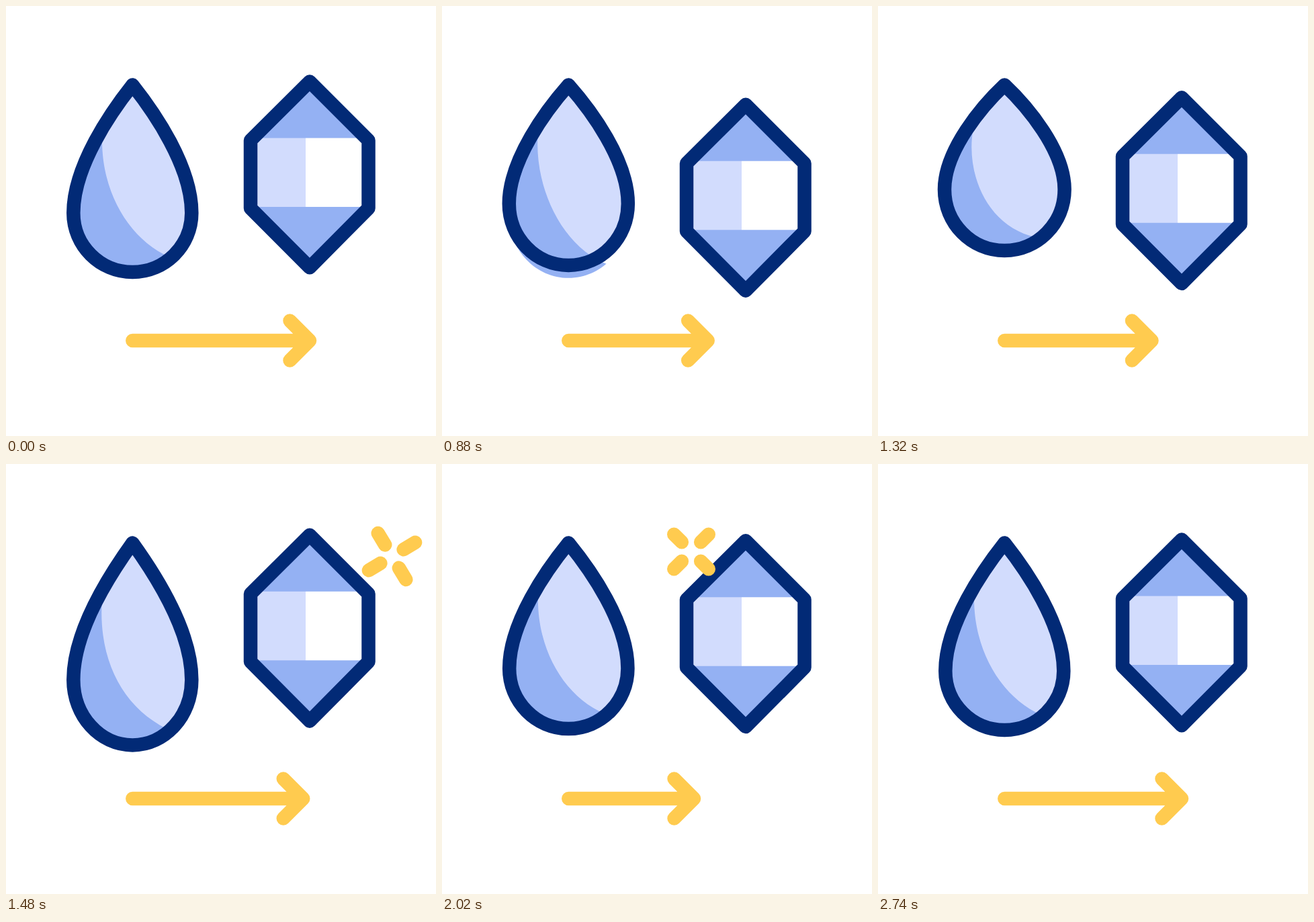
Recreate the animation shown at these times as an HTML page. Size 640 px wide and 640 px high, loop 3300 ms.

```html
<!DOCTYPE html>
<html lang="en">
<head>
<meta charset="utf-8">
<title>Drop to crystal</title>
<style>
  html, body { margin: 0; width: 100%; height: 100%; overflow: hidden; background: #fff; }
  svg { display: block; width: 100%; height: 100%; }
  .line { fill: none; stroke-width: 20.5; stroke-linecap: round; stroke-linejoin: round; }
  .navy { stroke: #022a76; }
  .gold { stroke: #ffcb4f; }
  .mid { fill: #94b1f3; }
  .pale { fill: #d2dcfd; }
  .white { fill: #fff; }
</style>
</head>
<body>
<svg viewBox="0 0 640 640">
  <clipPath id="shadeClip"><path id="shadeEdge"/></clipPath>
  <path id="dropFill" class="pale"/>
  <path id="shade" class="mid" clip-path="url(#shadeClip)"/>
  <path id="dropLine" class="line navy"/>

  <g id="gem">
    <path class="mid" d="M452 112.5L539.5 200V301L452 389.3L364 301V200Z"/>
    <path class="pale" d="M364 196.5H446V299H364Z"/>
    <path class="white" d="M446 196.5H539V299H446Z"/>
    <path class="line navy" d="M452 112.5L539.5 200V301L452 389.3L364 301V200Z"/>
  </g>

  <path id="arrow" class="line gold"/>
  <path id="sparkles" class="line gold"/>
</svg>
<script>
const LOOP = 3300, STEP = 20, SQUASH_AT = 1140;
const el = id => document.getElementById(id);
const setPath = (id, d) => el(id).setAttribute('d', d);
const mix = (a, b, u) => a + (b - a) * u;
const clamp = u => Math.min(1, Math.max(0, u));
const ease = u => u * u * (3 - 2 * u);

// Eased travel through turning points, each [time, value]
const travel = (turns, t) => turns.slice(1).reduce((v, [end, to], i) =>
  mix(v, to, ease(clamp((t - turns[i][0]) / (end - turns[i][0])))), turns[0][1]);

const gemTurns = [[500, 0], [1098, 49.2], [1660, -24.5], [2240, 14.3], [2740, 0]];
const dropTurns = [[500, 0], [723, 24.5], [SQUASH_AT, -84], [1510, 24.5], [2000, -2], [2300, 0]];

const gemShift = t => travel(gemTurns, t);
const dropShift = t => travel(dropTurns, t);

// The shade trails the outline until both meet at the squash
const shadeShift = t => dropShift(t - .22 * Math.max(0, SQUASH_AT - t));

// Two equal trips back and forth
function arrowTip(t) {
  const trips = Math.min(4, Math.max(0, (t - 560) / 515));
  return 452 - 83 * ease(1 - Math.abs(trips % 2 - 1));
}

// How flat the drop is: 1 squashed, 0 at rest, below 0 stretched
function flatness(shift) {
  const s = -shift / 83;
  return s > 0 ? s ** .8 : .65 * s;
}

// Teardrop whose bottom moves while the tip stays
function teardrop(shift) {
  const q = flatness(shift), cx = 188.3, top = 117.5, k = .552;
  const rx = 88 + 2.8 * Math.max(0, q), wide = 308 - 75 * q, low = 396 + shift;
  const neck = 31.3 + 3 * q, neckY = 157 - 19 * q, sideY = 238 - 50 * q;
  const kx = rx * k, ky = mix(wide, low, k);
  return `M${cx} ${top}C${cx - neck} ${neckY} ${cx - rx} ${sideY} ${cx - rx} ${wide}` +
    `C${cx - rx} ${ky} ${cx - kx} ${low} ${cx} ${low}` +
    `C${cx + kx} ${low} ${cx + rx} ${ky} ${cx + rx} ${wide}` +
    `C${cx + rx} ${sideY} ${cx + neck} ${neckY} ${cx} ${top}Z`;
}

// Inner edge of the shade: its top follows the outline, its foot the shade
function shadeEdge(outline, shade) {
  const q = flatness(outline), bend = Math.abs(q), s = -shade / 83;
  const y = 200 - 40 * q;
  return `M${143 - 2 * bend} ${y}C${143 - 30 * bend} ${285 - 80 * q} ` +
    `${190 - 60 * bend} ${355 - 54 * s} ${252 - 15 * bend} ${377 - 80 * s}V640H0V${y}Z`;
}

const bursts = [
  { x: 366, y: 399, tilt: 45, start: 890 },
  { x: 574.5, y: 137.5, tilt: 59, start: 1400 },
  { x: 371, y: 130.5, tilt: 45, start: 1961 }
];

// Four rays shoot out, then their inner ends catch up
function burst({ x, y, tilt, start }, t) {
  const age = (t - start) / 150;
  if (age <= 0 || age >= 2) return '';
  const outer = mix(20, 46, 1 - (1 - clamp(age)) ** 2);
  const inner = mix(20, 46, clamp(age - 1));
  let d = '';
  for (let i = 0; i < 4; i++) {
    const a = (tilt + 90 * i) * Math.PI / 180, c = Math.cos(a), s = Math.sin(a);
    d += `M${x + inner * c} ${y + inner * s}L${x + outer * c} ${y + outer * s}`;
  }
  return d;
}

function draw(t) {
  const outline = dropShift(t), shade = shadeShift(t);
  setPath('dropFill', teardrop(outline));
  setPath('dropLine', teardrop(outline));
  setPath('shade', teardrop(shade));
  setPath('shadeEdge', shadeEdge(outline, shade));

  el('gem').setAttribute('transform', `translate(0 ${gemShift(t)})`);

  const tip = arrowTip(t), barb = tip - 29.5;
  setPath('arrow', `M188.3 498H${tip}M${barb} 468.5L${tip} 498L${barb} 527.5`);
  setPath('sparkles', bursts.map(b => burst(b, t)).join(''));
}

function tick() {
  const t = performance.now() % LOOP;
  draw(Math.floor(t / STEP) * STEP);
  requestAnimationFrame(tick);
}
tick();
</script>
</body>
</html>
```
